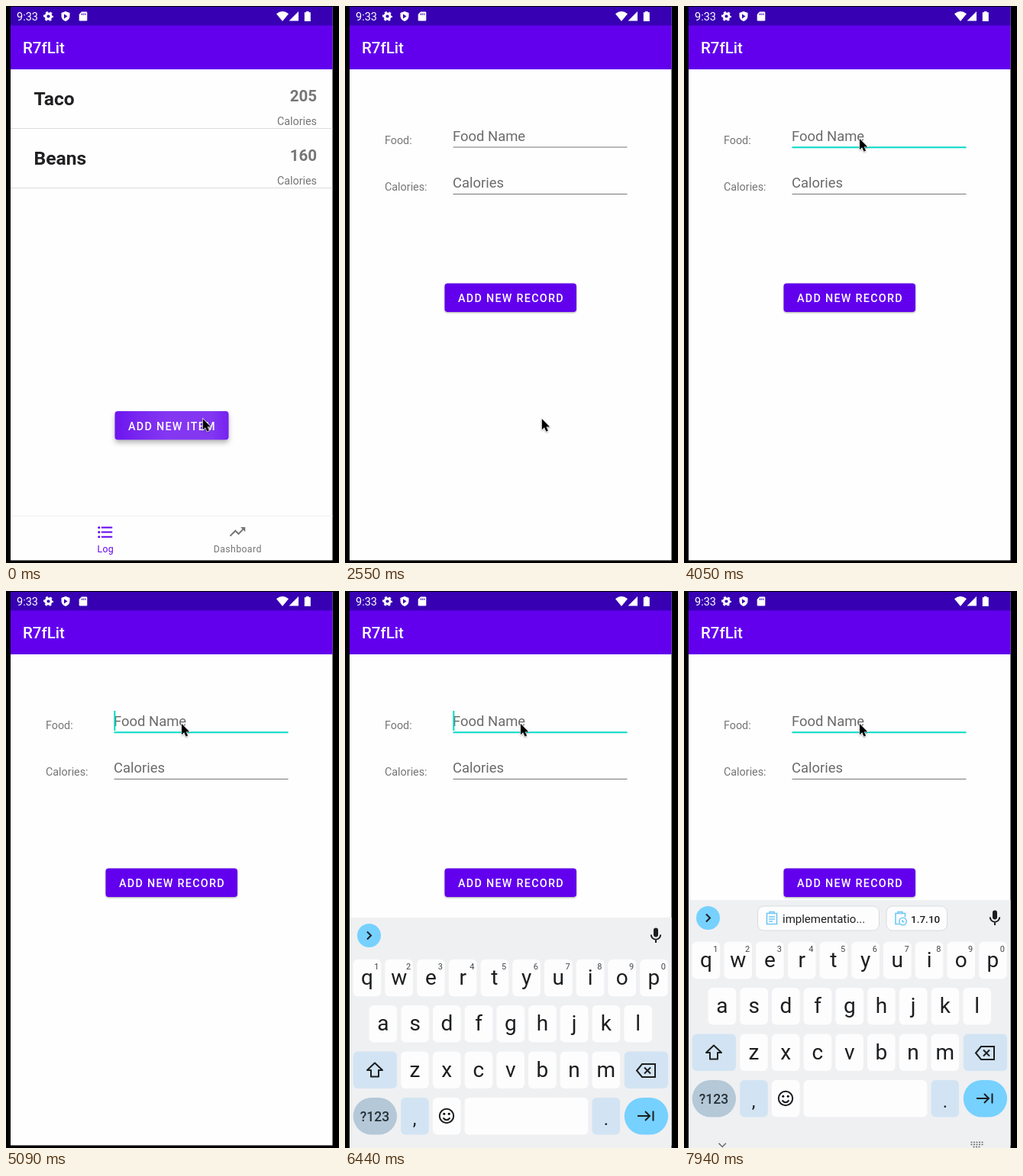
These frames come from a looping animation (436 by 730 pixels, 8000 ms). An HTML page:

```html
<!DOCTYPE html>
<html lang="en">
<head>
<meta charset="utf-8">
<title>Food log</title>
<style>
  html, body { margin: 0; width: 100%; height: 100%; overflow: hidden; background: #000; }
  svg { display: block; }
  text { font-family: Roboto, sans-serif; font-size: 14.34px; fill: #757575; }
  .title { font-size: 20.5px; font-weight: 500; fill: #fff; }
  .food { font-size: 24.6px; font-weight: 700; fill: #212124; }
  .count { font-size: 20.5px; font-weight: 700; }
  .right { text-anchor: end; }
  .tab { font-size: 12.3px; letter-spacing: .4px; text-anchor: middle; }
  .hint { font-size: 18.44px; fill: #6b6b6b; }
  .button { fill: #6200ee; filter: drop-shadow(0 1px 1px rgba(0, 0, 0, .35)); }
  .label { font-weight: 500; letter-spacing: 1.28px; fill: #fff; }
  .key { font-size: 28px; fill: #1d1e20; text-anchor: middle; }
  .digit { font-size: 11px; fill: #45474a; text-anchor: middle; }
  .chip { fill: #fdfdfe; stroke: #d9dbde; }
  .chip-text { font-size: 15px; fill: #1d1e20; }
  .ink { fill: none; stroke: #1d1e20; stroke-width: 2; }
  .blue { fill: none; stroke: #70c8f5; stroke-width: 1.6; }
</style>
</head>
<body>
<svg width="436" height="730" viewBox="0 0 436 730">
  <defs>
    <linearGradient id="ripple">
      <stop offset="0" stop-color="#6d14ef"/>
      <stop offset=".2" stop-color="#7826f0"/>
      <stop offset=".45" stop-color="#8337f1"/>
      <stop offset=".85" stop-color="#8337f1"/>
      <stop offset="1" stop-color="#7622f0"/>
    </linearGradient>
  </defs>

  <rect x="6" y="1" width="421.5" height="725.5" fill="#fefefe"/>
  <rect x="6" y="1" width="421.5" height="25" fill="#3700b3"/>
  <rect x="6" y="25.5" width="421.5" height="57.5" fill="#6200ee"/>

  <!-- status bar -->
  <g fill="#fff">
    <text x="14" y="19" style="font-size:14.5px;fill:#fff">9:33</text>
    <g fill="none" stroke="#fff">
      <circle cx="55.5" cy="13.5" r="3.6" stroke-width="3"/>
      <circle cx="55.5" cy="13.5" r="5.5" stroke-width="2" stroke-dasharray="2.88" stroke-dashoffset="1.44"/>
    </g>
    <path d="M78 7l5.5 2v4c0 3.5-2.5 6-5.5 7-3-1-5.5-3.500-5.500-7V9z"/>
    <path d="M76 10.500v6l4.500-3z" fill="#3700b3"/>
    <path d="M99 7.500h6q1.300 0 1.300 1.300v9.400q0 1.300-1.300 1.300h-8q-1.300 0-1.300-1.300V11z"/>
    <path d="M99.500 9.500v2.500m2.200-2.500v2.500m2.200-2.500v2.500" stroke="#3700b3"/>
    <path d="M354 10.300q8-6.400 16 0L362 20zM383 7v12.500h-12.500z"/>
    <path d="M393 7h3.500v1.300h2.300V20h-8V8.300h2.200z"/>
  </g>
  <text class="title" x="22" y="62">R7fLit</text>

  <!-- food log -->
  <g id="log">
    <path d="M6 160.500h421.500M6 238.500h421.500" stroke="#dcdcdc"/>
    <text class="food" x="36.500" y="130">Taco</text>
    <text class="count right" x="407" y="125">205</text>
    <text class="right" x="407" y="156">Calories</text>
    <text class="food" x="36.500" y="208">Beans</text>
    <text class="count right" x="407" y="203">160</text>
    <text class="right" x="407" y="234">Calories</text>
    <rect id="add" class="button" x="142.500" y="531" width="149" height="37.500" rx="4"/>
    <text class="label" x="160" y="555.500">ADD NEW ITEM</text>
    <path d="M6 668.500h421.500" stroke="#f0f0f0"/>
    <g transform="translate(117.700 677.300) scale(1.0245)" fill="#6200ee">
      <path d="M7 5h14v2H7zM7 11h14v2H7zM7 17h14v2H7z"/>
      <circle cx="4" cy="6" r="1.500"/><circle cx="4" cy="12" r="1.500"/><circle cx="4" cy="18" r="1.500"/>
    </g>
    <text class="tab" x="130.300" y="716" style="fill:#6200ee">Log</text>
    <path transform="translate(290.700 676.900) scale(1.0245)" fill="#757575"
      d="M16 6l2.290 2.290-4.880 4.880-4-4L2 16.590 3.410 18l6-6 4 4 6.300-6.290L22 12V6z"/>
    <text class="tab" x="303.200" y="716">Dashboard</text>
  </g>

  <!-- new record form -->
  <g id="form">
    <text x="52" y="181">Food:</text>
    <text x="52" y="242">Calories:</text>
    <text class="hint" x="141" y="177">Food Name</text>
    <text class="hint" x="141" y="238">Calories</text>
    <rect id="underline" x="141.500" width="228"/>
    <rect x="141.500" y="246" width="228" height="1" fill="#777"/>
    <rect id="caret" x="141.300" y="157" width="2" height="26" fill="#03dac5"/>
    <rect class="button" x="130.500" y="363.500" width="172.500" height="37.500" rx="4"/>
    <text class="label" x="148" y="388">ADD NEW RECORD</text>
  </g>

  <g id="keyboard">
    <rect x="6" y="405" width="421.500" height="325" fill="#eff0f2"/>
    <g id="keys"></g>
    <circle cx="31.500" cy="428.500" r="15.500" fill="#76d1ff"/>
    <path class="ink" d="M29 423.500l5 5-5 5"/>
    <rect x="404" y="418.500" width="6" height="12" rx="3" fill="#1d1e20"/>
    <path class="ink" d="M400.800 427.500a6.200 6.200 0 0 0 12.400 0M407 433.500v4.500" stroke-width="1.800"/>
    <path class="ink" d="M39 595.500l10 9.500h-5v8.500h-10V605h-5z" stroke-linejoin="round"/>
    <path class="ink" d="M389 597h17v17h-17l-7-8.500zM392 601.500l8 8m0-8l-8 8"/>
    <circle class="ink" cx="133" cy="665" r="9.200"/>
    <path class="ink" d="M128.500 667.500q4.500 5.500 9 0"/>
    <circle cx="129.800" cy="662.300" r="1.500"/><circle cx="136.200" cy="662.300" r="1.500"/>
    <path class="ink" d="M383 665h16m-6-6l6 6-6 6M403.500 658.500v13"/>
    <text class="key" x="39" y="672" style="font-size:17.500px;font-weight:500;fill:#26323a">?123</text>
    <text class="key" x="91" y="677" style="font-size:24px">,</text>
    <text class="key" x="342" y="677" style="font-size:24px">.</text>
    <g id="chips">
      <rect class="chip" x="96.500" y="413" width="159" height="32" rx="8"/>
      <rect class="chip" x="265" y="413" width="79.500" height="32" rx="8"/>
      <path class="blue" d="M108.500 422.500h13v14h-13zM112 422v-1.500h6v1.500M111 427h8m-8 3h8m-8 3h5"/>
      <path class="blue" d="M282 436.500h-5v-14h12.500v5M280 422v-1.500h6v1.500M286 431v2.500h2.500"/>
      <circle class="blue" cx="286.500" cy="433" r="4.700"/>
      <text class="chip-text" x="129" y="435">implementatio...</text>
      <text class="chip-text" x="297" y="435" style="font-size:13.500px;font-weight:500">1.7.10</text>
    </g>
    <g id="tray" fill="none" stroke="#66686b">
      <path d="M45.500 723.800l4.700 4.700 4.700-4.700" stroke-width="1.500"/>
      <path d="M375.500 722.500h16m-16 3h16m-13 3h10" stroke-width="1.600" stroke-dasharray="2 1.500"/>
    </g>
  </g>

  <path id="pointer" d="M0 0v14.300l3.200-3 2.400 5.400 2.500-1.100-2.400-5.200h4.600z"
    stroke="#fff" stroke-width="1.200" paint-order="stroke"
    style="filter:drop-shadow(0 1px 1px rgba(0,0,0,.3))"/>
</svg>

<script>
const $ = id => document.getElementById(id);
const set = (node, attrs) => Object.entries(attrs).forEach(([k, v]) => node.setAttribute(k, v));

function add(tag, attrs, content = '') {
  const node = document.createElementNS('http://www.w3.org/2000/svg', tag);
  set(node, attrs);
  node.textContent = content;
  $('keys').append(node);
}
const addKey = (x, y, width, fill = '#fdfdfe', rx = 6) =>
  add('rect', { x, y, width, height: 48.5, rx, fill });

const PITCH = 41.72, WIDTH = 36.6, TINT = '#d2e4f3';
[['qwertyuiop', 10.7, 459.7], ['asdfghjkl', 31.6, 520], ['zxcvbnm', 73.2, 580.4]].forEach(([row, left, y], r) => {
  [...row].forEach((letter, i) => {
    const x = left + i * PITCH;
    addKey(x, y, WIDTH);
    add('text', { class: 'key', x: x + WIDTH / 2, y: y + 33.3 }, letter);
    if (r === 0) add('text', { class: 'digit', x: x + 30.6, y: 472.5 }, (i + 1) % 10);
  });
});
addKey(10.7, 580.4, 57.3, TINT);
addKey(365.8, 580.4, 57.3, TINT);
addKey(10.7, 641, 57.3, '#b4c8d7', 24.25);
addKey(73.2, 641, WIDTH, TINT);
addKey(114.9, 641, WIDTH);
addKey(156.6, 641, 161.8);
addKey(323.5, 641, WIDTH, TINT);
addKey(365.8, 641, 57.3, '#76d1ff', 24.25);

// Each track lists [start ms, value]; a value holds until the next start.
const LOOP = 8000;
const tracks = {
  page: [[0, 'log'], [2550, 'form']],
  press: [[0, 2], [450, 1], [600, 0]],
  pointer: [[0, [257.8, 541]], [3000, [248, 456]], [3150, [297.5, 123]],
            [3450, [248, 162.500]], [3600, [234, 172]], [3750, [230, 174]]],
  focus: [[0, false], [4050, true]],
  caret: [[0, 0], [4190, 1], [4640, 0], [5090, 1], [5690, 0], [6140, 1], [6770, 0], [7400, 1], [7760, 0]],
  keyboard: [[0, null], [6440, 23], [6590, 0]],
  tray: [[0, 0], [6770, .7], [7400, .85], [7550, 1]]
};
const pressStyles = [
  ['#6200ee', ''],
  ['#6c12ef', 'drop-shadow(0 2px 2px rgba(0,0,0,.3))'],
  ['url(#ripple)', 'drop-shadow(0 4px 3px rgba(0,0,0,.28))']
];
const show = (id, on) => { $(id).style.display = on ? '' : 'none'; };

function render(time) {
  const at = name => tracks[name].filter(([start]) => start <= time).pop()[1];
  show('log', at('page') === 'log');
  show('form', at('page') === 'form');

  const [fill, filter] = pressStyles[at('press')];
  Object.assign($('add').style, { fill, filter });

  set($('pointer'), { transform: `translate(${at('pointer')})` });
  set($('underline'), at('focus')
    ? { y: 184.3, height: 2, fill: '#03dac5' }
    : { y: 184.5, height: 1, fill: '#777' });
  show('caret', at('caret'));

  const shift = at('keyboard');
  show('keyboard', shift !== null);
  show('chips', shift === 0);
  set($('keyboard'), { transform: `translate(0 ${shift || 0})` });
  set($('tray'), { opacity: at('tray') });
}

function tick() {
  render(performance.now() % LOOP);
  requestAnimationFrame(tick);
}
tick();
</script>
</body>
</html>
```
